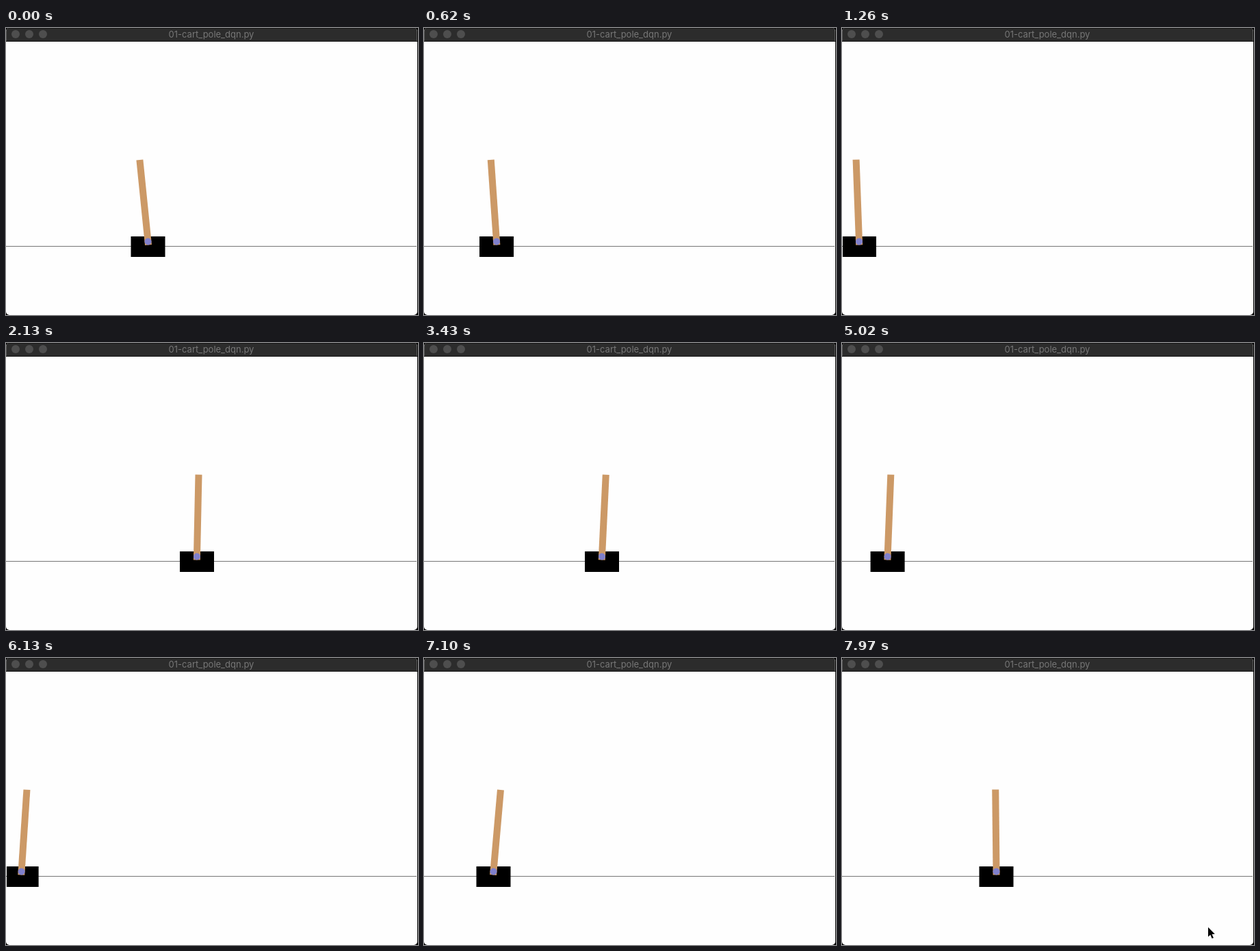
An HTML page with a canvas that plays this animation: 602 px wide and 420 px high, repeating every 8000 ms.

```html
<!DOCTYPE html>
<html lang="en">
<head>
<meta charset="utf-8">
<title>Cart pole</title>
<style>
  html, body { margin: 0; width: 100%; height: 100%; overflow: hidden; background: #000; }
  canvas { display: block; }
</style>
</head>
<body>
<canvas id="stage" width="602" height="420"></canvas>
<script>
const ctx = document.getElementById('stage').getContext('2d');
const LOOP = 8000, STEP = 57.2;
const RESET = 26; // step at which the cart leaves the track and a new run begins

// First run: the cart drifts left, slowing evenly, while the pole rights itself.
const firstRun = s => ({
  x: 207.5 - 10.154 * s + 0.0845 * s * s,
  lean: -5.8 + 0.168 * s
});

// Second run: [step, cart centre] at turns and changes of pace, [step, degrees] for the pole.
const path = [[26, 298], [32, 303], [41, 261.8], [51, 304.6], [60, 260],
              [74, 163.2], [89, 62], [103, 18], [124, 101.5], [139, 225.5]];
const sway = [[26, 0], [37, 1.2], [60, 2.75], [88, 2.25], [124, 5], [139, -0.6]];
const secondRun = s => ({ x: sample(path, s), lean: sample(sway, s) });

const slope = (a, b) => (b[1] - a[1]) / (b[0] - a[0]);

// Harmonic mean of the neighbouring slopes, flat at a turning point.
function tangent(keys, i) {
  if (i === 0) return slope(keys[0], keys[1]);
  if (i === keys.length - 1) return slope(keys[i - 1], keys[i]);
  const a = slope(keys[i - 1], keys[i]), b = slope(keys[i], keys[i + 1]);
  return a * b <= 0 ? 0 : 2 * a * b / (a + b);
}

// Smooth curve through the keys.
function sample(keys, s) {
  let i = 0;
  while (i < keys.length - 2 && s >= keys[i + 1][0]) i++;
  const [s0, v0] = keys[i], [s1, v1] = keys[i + 1];
  const h = s1 - s0, u = Math.min(1, (s - s0) / h), w = 1 - u;
  return v0 * (1 + 2 * u) * w * w + tangent(keys, i) * h * u * w * w
       + v1 * u * u * (3 - 2 * u) - tangent(keys, i + 1) * h * u * u * w;
}

function disc(x, y, r, color) {
  ctx.fillStyle = color;
  ctx.beginPath();
  ctx.arc(x, y, r, 0, 7);
  ctx.fill();
}

function rect(x, y, w, h, color) {
  ctx.fillStyle = color;
  ctx.fillRect(x, y, w, h);
}

function drawWindow() {
  rect(0, 0, 602, 420, '#000');
  ctx.save();
  ctx.beginPath();
  ctx.roundRect(0, 0, 601, 420, 5);
  ctx.clip();
  rect(0, 0, 601, 420, '#fefefe');
  rect(0, 0, 601, 20, '#5c5c5c');
  rect(1, 0, 599, 20, '#2c2c2c');
  rect(0, 0, 601, 1, '#161616');
  rect(0, 19, 601, 1, '#141414');
  ctx.restore();
  for (const x of [14, 34, 54]) disc(x, 9, 6, '#4e4e4e');
  ctx.font = '13px Inter, sans-serif';
  ctx.textAlign = 'center';
  ctx.fillStyle = '#777';
  ctx.fillText('01-cart_pole_dqn.py', 300, 14);
  rect(0, 319, 600, 1, '#767676');
}

function drawCart({ x, lean }) {
  ctx.save();
  ctx.beginPath();
  ctx.rect(1, 20, 600, 400);
  ctx.clip();
  rect(x - 25, 305, 50, 30, '#000');
  ctx.translate(x, 312.5);
  ctx.rotate(lean * Math.PI / 180);
  rect(-5, -120, 10, 125, '#cc9966');
  disc(0, 0, 5, '#8080cc');
  ctx.restore();
}

function drawPointer(x, y) {
  ctx.save();
  ctx.translate(x, y);
  const arrow = new Path2D('M0 0V14L3.2 11L5.6 16.6L7.9 15.6L5.5 10.2L9.8 10Z');
  ctx.lineWidth = 2;
  ctx.strokeStyle = '#fff';
  ctx.stroke(arrow);
  ctx.fillStyle = '#000';
  ctx.fill(arrow);
  ctx.restore();
}

function draw(ms) {
  const s = Math.floor(ms / STEP + 0.3);
  drawWindow();
  drawCart(s < RESET ? firstRun(s) : secondRun(s));
  if (s >= 138) drawPointer(535, 394 + (139 - s) * 16);
}

const start = performance.now();
function tick() {
  draw((performance.now() - start) % LOOP);
  requestAnimationFrame(tick);
}
tick();
</script>
</body>
</html>
```
